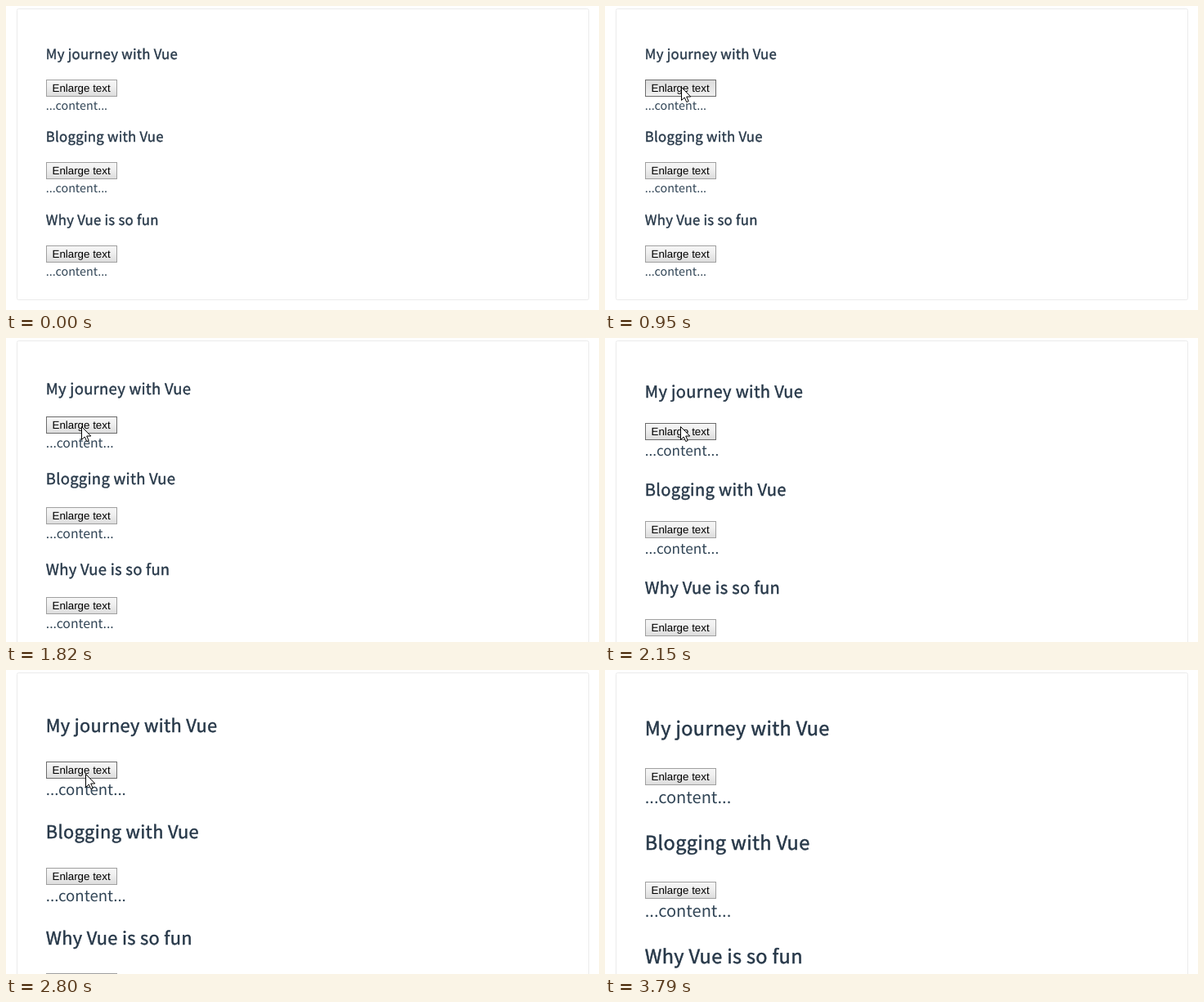
These frames come from a looping animation (725 by 372 pixels, 4.67 s). An HTML page:

```html
<!DOCTYPE html>
<html lang="en">
<head>
<meta charset="utf-8">
<title>Enlarge text</title>
<style>
  html, body { margin: 0; width: 100%; height: 100%; overflow: hidden; background: #fff; }
  svg { position: absolute; left: 0; top: 0; }
  text { font-family: "Noto Sans CJK SC", "Noto Sans CJK JP", "Noto Sans CJK", "Noto Sans", sans-serif;
         text-rendering: geometricPrecision; white-space: pre; }
  .title { fill: #273849; stroke: #273849; stroke-width: .022em; letter-spacing: .016em; }
  .body { fill: #304455; }
  .label { font: 13.333px "Liberation Sans", Arial, sans-serif; fill: #000; }
  .button rect { fill: url(#up); stroke: #a0a0a0; }
  .button.hover rect { stroke: #6c6c6c; }
  .button.pressed rect { fill: url(#down); stroke: #6c6c6c; }
</style>
</head>
<body>
<svg width="725" height="372" viewBox="0 0 725 372">
  <defs>
    <linearGradient id="up" x2="0" y2="1">
      <stop stop-color="#f6f6f6"/><stop offset=".4" stop-color="#f0f0f0"/><stop offset="1" stop-color="#dcdcdc"/>
    </linearGradient>
    <linearGradient id="down" x2="0" y2="1">
      <stop stop-color="#dcdcdc"/><stop offset="1" stop-color="#f0f0f0"/>
    </linearGradient>
  </defs>
  <rect id="card" x="13.5" y="3.5" width="699" rx="2" fill="none" stroke="#ebebeb"/>
  <g id="posts"></g>
  <path id="cursor" d="M.5 .5v16l3.7-3.5 2.6 5.6 2.4-1.1-2.5-5.5h5.1z" fill="#fff" stroke="#000"/>
</svg>
<script>
const LOOP = 4670, LEFT = 48.8;
const FONT_SCALE = 1 / 1.118;   // the CJK family draws its Latin letters larger
const $ = id => document.getElementById(id);

// Layout of each text size: top of the first button, distance between posts
const layouts = [[90, 101.5], [96.5, 110.5], [104, 120], [112.3, 129.7], [120, 139.5]];
const enlargeTimes = [1050, 2150, 2593, 3020];
const presses = [[950, 1050], [2030, 2150], [2490, 2593]];

// Cursor positions hold until the next one: [time, x, y]
const glide = (count, t0, t1, from, to) => Array.from({ length: count }, (_, i) => {
  const p = i / (count - 1), mix = (a, b) => Math.round(a + (b - a) * p);
  return [mix(t0, t1), mix(from[0], to[0]), mix(from[1], to[1])];
});
const moves = [
  [0, -50, -50],
  ...glide(5, 100, 520, [16, 163], [93, 99]),
  [1820, 92, 108],
  [2697, 95, 118],
  [2800, 97, 127],
  ...glide(4, 3350, 3680, [200, 180], [579, 356]),
  [3790, -50, -50]
];

$("posts").innerHTML = ["My journey with Vue", "Blogging with Vue", "Why Vue is so fun"].map(title => `
  <text class="title" x="${LEFT}">${title}</text>
  <g class="button">
    <rect x="49.5" y=".5" width="86" height="20"/>
    <text class="label" x="56.5" y="15">Enlarge text</text>
  </g>
  <text class="body" x="${LEFT}">...content...</text>`).join("");

const titles = document.querySelectorAll(".title");
const buttons = document.querySelectorAll(".button");
const bodies = document.querySelectorAll(".body");

function draw(t) {
  const step = enlargeTimes.filter(e => t >= e).length;
  const scale = 1 + step / 10;
  const [top, pitch] = layouts[step];
  const [, x, y] = moves.findLast(m => t >= m[0]);
  const pressed = presses.some(([a, b]) => t >= a && t < b);

  $("card").setAttribute("height", step ? 400 : 356);
  $("cursor").setAttribute("transform", `translate(${x} ${y})`);

  buttons.forEach((button, i) => {
    const buttonTop = Math.floor(top + i * pitch);
    const hover = x >= 49 && x < 136 && y >= buttonTop && y < buttonTop + 21;
    button.setAttribute("transform", `translate(0 ${buttonTop})`);
    button.classList.toggle("hover", hover);
    button.classList.toggle("pressed", hover && pressed);

    titles[i].setAttribute("y", Math.floor(65.4 + 3.8 * step + i * pitch));
    titles[i].style.fontSize = 18.72 * scale * FONT_SCALE + "px";
    bodies[i].setAttribute("y", Math.floor(buttonTop + 37 + 1.5 * step));
    bodies[i].style.fontSize = 16 * scale * FONT_SCALE + "px";
  });
}

const start = performance.now();
function tick() {
  draw((performance.now() - start) % LOOP);
  requestAnimationFrame(tick);
}
tick();
</script>
</body>
</html>
```
